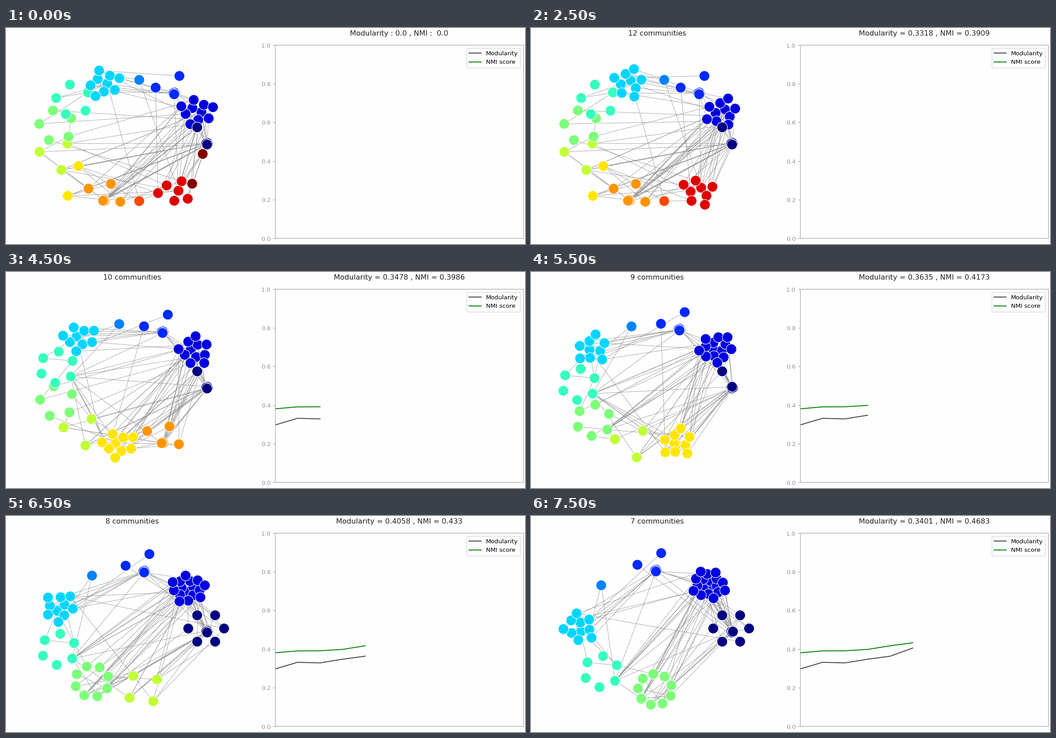
Recreate the animation shown at these times as a matplotlib script. Size 1159x483 px, loop 8000 ms.

```python
import numpy as np
import matplotlib.pyplot as plt
from matplotlib.animation import FuncAnimation
from matplotlib.collections import LineCollection

W, H, DPI = 1159, 483, 96.6
STEP = 500
GROUPS = "NBUMCTGLYORED"      # colour order, also the order round the ring
STACK = "OREDLYGTCMUBN"       # painting order
COLORS = {g: plt.cm.jet(i / 12) for i, g in enumerate(GROUPS)}
SIZES = dict(zip(GROUPS, (5, 10, 6, 1, 9, 5, 5, 3, 2, 6, 1, 6, 2)))

# Dissolved community: the new community of each of its members
MERGES = dict(D="EE", E="TYYYYBYY", R="Y", O="GBBBNN", Y="LGNBGNBNC", L="NGBB")

# Number of links within or between communities
LINKS = dict(BB=4, CC=8, EE=4, TT=2, NN=3, BN=6, BO=13, BE=7, BD=2, BU=4,
             BG=3, BL=3, BC=2, NO=5, NE=4, NL=5, NY=4, ND=2, NU=1, UC=7,
             UE=2, MC=1, ME=1, CT=3, CR=1, TG=1, GL=2, GE=1, LO=3, LE=2,
             YO=3, YE=2, YR=1, OE=2, ER=1, DE=3)

# Communities with a tight core: loose nodes, first angle, angle step
CORES = dict(N=(1, 120, 60), U=(2, 70, 100), O=(3, -16, 80))

MODULARITY = [0.297, 0.3318, 0.3288, 0.3478, 0.3635, 0.4058, 0.3401]
NMI = [0.3809, 0.3909, 0.3915, 0.3986, 0.4173, 0.433, 0.4683]


def polar(deg, rx, ry):
    a = np.radians(deg)
    return np.stack([rx * np.cos(a), -ry * np.sin(a)], axis=-1)


def centre(g, stage):
    """Place of a community on the ring, which has fewer slots each stage."""
    slots = min(13, 14 - stage)
    return np.array([277, 251.5]) + polar(360 * GROUPS.index(g) / slots, 170, 136.5)


def cluster(g, n, stage):
    """Offsets of n nodes: tight core, open ring or filled disc."""
    j = np.arange(n)
    if n == 1:
        return np.zeros((1, 2))
    if g in CORES:
        loose, turn, step = CORES[g]
        loose = loose if n < 8 else 6
        core = j[:n - loose]
        return np.vstack([polar(90 * core, 2, 2) + (2, 7),
                          polar(turn + step * j[:loose], 40, 34)])
    if g in "TGL" or n < 6:
        return polar((144 + 360 * j) / n, 38, 35)
    r = np.sqrt((j + 0.5) / n)
    return polar(137.5 * j + 50 * stage, 40 * r, 35 * r)


def layout(members, stage):
    return {n: p for g, names in members.items()
            for n, p in zip(names, centre(g, stage) + cluster(g, len(names), stage))}


def merge(members, pos, old, targets, stage):
    """Dissolve one community; its nodes land around their new centres."""
    new = {g: list(names) for g, names in members.items() if g != old}
    pos = dict(pos)
    for n, g in zip(members[old], targets):
        arrived = len(new[g]) - len(members[g])
        pos[n] = centre(g, stage) + polar(30 + 50 * arrived, 45, 45)
        new[g].append(n)
    return new, pos


def build_poses():
    members = {g: [f"{g}{i}" for i in range(SIZES[g])] for g in GROUPS}
    pos = layout(members, 0)
    poses = [(members, pos)]
    for stage, (old, targets) in enumerate(MERGES.items()):
        members, pos = merge(members, pos, old, targets, stage)
        poses.append((members, pos))
        pos = layout(members, stage + 1)
        poses.append((members, pos))
    return poses


def build_edges():
    """Random links that favour the first nodes of each community."""
    rng = np.random.default_rng(7)
    pick = lambda g: f"{g}{int(SIZES[g] * rng.random() ** 1.4)}"
    return [(pick(a), pick(b)) for (a, b), n in LINKS.items() for _ in range(n)]


POSES = build_poses()
EDGES = build_edges()

plt.rcParams["font.family"] = "DejaVu Sans"
fig = plt.figure(figsize=((W + 0.01) / DPI, (H + 0.01) / DPI), dpi=DPI,
                 facecolor="#fefefe")

net = fig.add_axes([0, 0, 1, 1])
net.set(xlim=(0, W), ylim=(H, 0))
net.axis("off")
edges = LineCollection([], colors="#909090", linewidths=0.6, zorder=1)
net.add_collection(edges)
nodes = net.scatter([], [], s=300, edgecolors="white", linewidths=0.9, zorder=2)
style = dict(ha="center", va="baseline", fontsize=12, color="#222222")
count = net.text(281.5, 16.8, "", **style)
score = net.text(878, 16.8, "", **style)

GRAY = "#969696"
chart = fig.add_axes([600.5 / W, 1 - 470.5 / H, 554.5 / W, 432 / H],
                     facecolor="#fefefe")
chart.set(xlim=(0, 11), ylim=(0, 1), xticks=[], yticks=np.linspace(0, 1, 6))
chart.tick_params(colors=GRAY, labelsize=10)
for side in chart.spines.values():
    side.set_color(GRAY)
mod_line, = chart.plot([], [], color="#444444", lw=1.5, label="Modularity")
nmi_line, = chart.plot([], [], color="green", lw=1.5, label="NMI score")
chart.legend(loc="upper right", fontsize=10)


def draw(i):
    k = max(i - 3, 0)
    stage = k // 2
    members, pos = POSES[k]

    order = [(n, g) for g in STACK if g in members for n in members[g]]
    nodes.set_offsets([pos[n] for n, _ in order])
    nodes.set_facecolors([COLORS[g] for _, g in order])
    edges.set_segments([(pos[a], pos[b]) for a, b in EDGES])

    if i < 3:
        count.set_text("")
        score.set_text("Modularity : 0.0 , NMI :  0.0")
    else:
        count.set_text(f"{len(members)} communities")
        score.set_text(f"Modularity = {MODULARITY[stage]} , NMI = {NMI[stage]}")

    mod_line.set_data(range(stage), MODULARITY[:stage])
    nmi_line.set_data(range(stage), NMI[:stage])
    return edges, nodes, count, score, mod_line, nmi_line


anim = FuncAnimation(fig, draw, frames=16, interval=STEP, repeat=True,
                     repeat_delay=0, blit=False)
plt.show()
```
